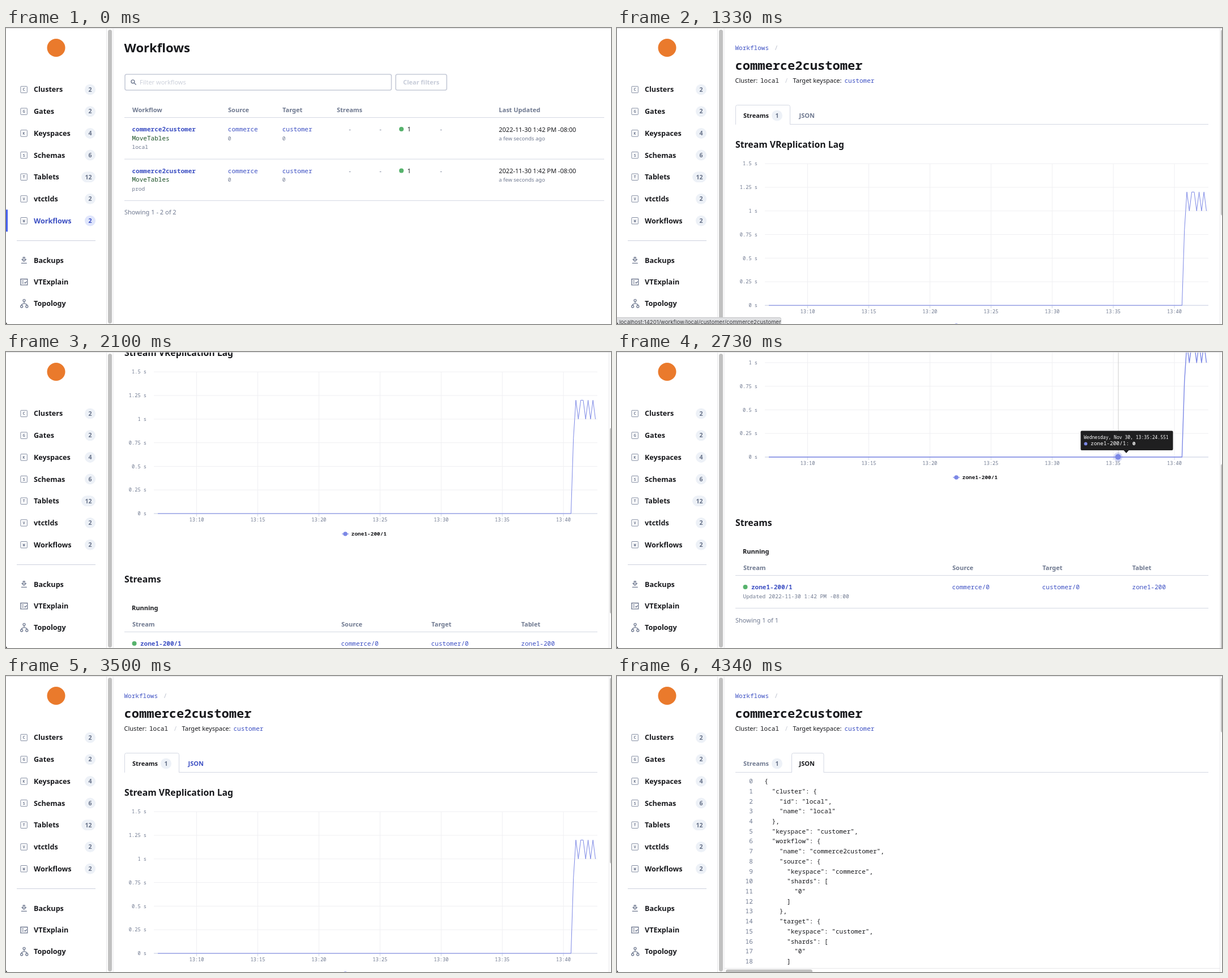
Animation, 1068 px wide and 524 px high, one loop 5.25 s. Source, as an HTML page:

```html
<!DOCTYPE html>
<html lang="en">
<head>
<meta charset="utf-8">
<title>Workflows</title>
<style>
  html, body { margin: 0; width: 100%; height: 100%; overflow: hidden; background: #fff; }
  svg { display: block; width: 1068px; height: 524px; font-family: "Noto Sans", sans-serif; }
  .m { font-family: "Noto Sans Mono", monospace; }
  .u { font-family: Inter, sans-serif; }
  .b { font-weight: 600; }
  .mid { text-anchor: middle; }
  .end { text-anchor: end; }
</style>
</head>
<body>
<svg id="stage" viewBox="0 0 1068 524"></svg>
<script>
const INK = '#17181c', GREY = '#6f7990', PALE = '#c6cbd8', LINK = '#3d50c3',
      RULE = '#d4d8e3', SERIES = '#7c88e6', GREEN = '#56b26c';
const S = 11.03, XS = 9.46;

// y is the middle of the capital letters
const text = (x, y, str, cls = '', fill = INK, size = S) =>
  `<text x="${x}" y="${y + size * .357}" class="${cls}" fill="${fill}" font-size="${size}">${str}</text>`;
const line = (x1, y1, x2, y2, stroke = RULE, w = 1) =>
  `<path d="M${x1} ${y1}L${x2} ${y2}" stroke="${stroke}" stroke-width="${w}"/>`;
const rect = (x, y, w, h, r, fill, stroke = 'none', sw = 1) =>
  `<rect x="${x}" y="${y}" width="${w}" height="${h}" rx="${r}" fill="${fill}" stroke="${stroke}" stroke-width="${sw}"/>`;
const dot = (x, y, r, fill, extra = '') => `<circle cx="${x}" cy="${y}" r="${r}" fill="${fill}" ${extra}/>`;
const group = (id, ...parts) => `<g id="${id}">${parts.flat().join('')}</g>`;
const range = n => [...Array(n).keys()];

function badge(right, y, n, on) {
  const w = n > 9 ? 25 : 19;
  return rect(right - w, y - 9.5, w, 19, 9.5, on ? '#e0e6fc' : '#edf1f7') +
    text(right - w / 2, y, n, 'b mid', on ? LINK : '#68738a', 10.6);
}

function sidebar() {
  const items = [['Clusters', 2], ['Gates', 2], ['Keyspaces', 4], ['Schemas', 6],
    ['Tablets', 12], ['vtctlds', 2], ['Workflows', 2]];
  const row = (label, n, y, on) =>
    rect(25.9, y - 5.7, 11.4, 11.4, .8, 'none', '#828ca1') +
    text(31.6, y, label[0].toUpperCase(), 'm b mid', GREY, 7) +
    text(49, y, label, 'b', on ? LINK : INK, 12.6) + badge(158, y, n, on);
  const tools = ['Backups', 'VTExplain', 'Topology'].map((s, i) =>
    text(49, 412 + i * 37.9, s, 'b', INK, 12.6));
  const icons = `<g fill="none" stroke="${GREY}" stroke-width="1.3">
    <path d="M30.3 406h2.8v4h2l-3.4 3.2-3.4-3.2h2zM26.8 416.3h10"/>
    <path d="M25.8 444.5h12v10.4h-12zM27.8 447.8h3.6M27.8 451.4h3.6M32.6 450.3l1.3 1.4 2.6-3"/>
    <circle cx="32" cy="482.3" r="2"/><circle cx="27.6" cy="493" r="2"/><circle cx="36.8" cy="493" r="2"/>
    <path d="M32 484.3v3.2M27.6 491v-1.6l4.4-2 4.8 2v1.6"/></g>`;
  return [
    dot(88.5, 35, 16, '#ea7a2c'),
    ...items.map(([s, n], i) => row(s, n, 109 + i * 38.7, false)),
    group('active', rect(20, 325, 140, 32, 0, '#fff'), rect(0, 321.5, 3, 39, 0, '#4560ee'),
      row('Workflows', 2, 341.2, true)),
    line(19, 376.5, 158, 376.5, '#ccd1de'), tools, icons,
    line(177.5, 0, 177.5, 524, '#e6e6e8'), line(189, 0, 189, 524, '#e6e6e8'),
    rect(180, 3, 7, 520, 3.5, '#c1c1c1')
  ];
}

function listPage() {
  const head = [[223, 'Workflow'], [392, 'Source'], [488, 'Target'], [584, 'Streams'], [870, 'Last Updated']];
  const row = (y, cluster) => [
    text(222.5, y, 'commerce2customer', 'm b', LINK),
    text(222.5, y + 15.7, 'MoveTables', 'm', '#1d5128'),
    text(222.5, y + 31.5, cluster, 'm', GREY, XS),
    text(391.8, y, 'commerce', 'm', LINK), text(391.8, y + 16, '0', 'm', GREY, XS),
    text(487.7, y, 'customer', 'm', LINK), text(487.7, y + 16, '0', 'm', GREY, XS),
    [607, 661, 768].map(x => text(x, y, '-', 'mid', GREY)),
    dot(698, y - .2, 4, GREEN), text(708.5, y, '1'),
    text(870, y + .5, '2022-11-30 1:42 PM -08:00'),
    text(870, y + 16, 'a few seconds ago', '', GREY, XS),
    line(209, y + 52.8, 1056, y + 52.8)
  ].flat();
  const field = c => rect(210, 82, 470.4, 28, 3, 'none', c === LINK ? c : PALE, 1.6) +
    `<g fill="none" stroke="${c}" stroke-width="1.4"><circle cx="223.9" cy="94.8" r="2.9"/><path d="M226 97l3.6 3.6"/></g>`;
  return group('list',
    text(208.5, 35.5, 'Workflows', 'b', INK, 22.06),
    field(GREY), group('focus', field(LINK)),
    text(236, 96.5, 'Filter workflows', '', '#cdd1db'),
    rect(688, 82, 90, 28, 3, 'none', PALE, 1.6),
    text(733, 96.3, 'Clear filters', 'b mid', PALE),
    head.map(([x, s]) => text(x, 145, s, 'b', GREY)),
    line(209, 158.5, 1056, 158.5),
    row(179.3, 'local'), row(252.8, 'prod'),
    text(209, 326.5, 'Showing 1 - 2 of 2', '', GREY));
}

function detailHead() {
  return [
    text(208.5, 35.5, 'Workflows', 'm', LINK), text(279, 35.5, '/', '', '#b9bfcc'),
    text(208.5, 66.5, 'commerce2customer', 'm b', INK, 22.06),
    text(208.5, 93, 'Cluster:'), text(253, 93, 'local', 'm'),
    text(297, 93, '/', '', '#c6cbd6'),
    text(310.5, 93, 'Target keyspace:'), text(401.5, 93, 'customer', 'm', LINK),
    line(209, 170.5, 1044, 170.5)
  ];
}

const tab = (x, w) =>
  `<path d="M${x} 171.5V139.5q0-3 3-3h${w - 6}q3 0 3 3V171.5" fill="#fff"/>` +
  `<path d="M${x} 171V139.5q0-3 3-3h${w - 6}q3 0 3 3V171" fill="none" stroke="${RULE}"/>`;

function chart() {
  const left = 261, right = 1044, base = 491;
  const yOf = v => base - v * 167.2, xOf = i => 336.5 + i * 107.92;
  const lag = [0, .8, 1.2, 1, 1.2, 1.2, 1, 1.2, 1, 1.2, 1];
  const pts = lag.map((v, i) => `${997.4 + i * 4.31} ${yOf(v)}`).join('L');
  return [
    range(7).map(i => line(left, yOf(i / 4), right, yOf(i / 4), '#efeff2') +
      text(248, yOf(i / 4) + .2, i / 4 + ' s', 'm end', GREY, 8.67)),
    range(7).map(i => line(xOf(i), 240, xOf(i), base, '#efeff2') + line(xOf(i), base, xOf(i), base + 5, '#ccd3e6') +
      text(xOf(i), 502.3, '13:' + (10 + i * 5), 'm mid', GREY, 8.67)),
    line(left, base, right, base, '#ccd3e6'),
    group('cross', line(885, 240, 885, base, '#cccccc')),
    `<path id="series" d="M268 ${base}L${pts}" fill="none" stroke="${SERIES}" stroke-linejoin="round"/>`,
    line(593, 527, 605, 527, SERIES, 1.2), dot(599, 527, 3.8, SERIES),
    text(609.5, 527, 'zone1-200/1', 'm b', INK, XS),
    group('tip',
      dot(884.5, base - .3, 8, SERIES, 'opacity=".3"'), dot(884.5, base - .3, 5, SERIES),
      rect(818.5, 444.5, 163, 34.5, 2, '#1f1f20'),
      '<path d="M894 478.5h10l-5 5.5z" fill="#1f1f20"/>',
      text(824, 455.7, 'Wednesday, Nov 30, 13:35:24.551', 'm', '#fff', 8.06),
      dot(827.4, 467.4, 2.9, SERIES),
      text(836, 467, 'zone1-200/1: <tspan class="b">0</tspan>', 'm', '#fff', XS))
  ].flat();
}

function streamsTab() {
  const head = [[223, 'Stream'], [592, 'Source'], [751, 'Target'], [909.5, 'Tablet']];
  return group('streams',
    tab(209.5, 96), text(223, 155, 'Streams', 'b'), badge(292, 155, 1),
    text(321.5, 155, 'JSON', 'b', GREY).replace('<text', '<text id="json-label"'),
    text(209, 206, 'Stream VReplication Lag', 'b', INK, 15.76),
    chart(),
    text(209, 607, 'Streams', 'b', INK, 15.76),
    text(222, 658.5, 'Running', 'b'),
    head.map(([x, s]) => text(x, 687, s, 'b', GREY)),
    line(209, 700.5, 1044, 700.5),
    dot(226.5, 721, 4, GREEN), text(237, 721.3, 'zone1-200/1', 'm b', LINK),
    text(222.5, 737.7, 'Updated 2022-11-30 1:42 PM -08:00', 'm', GREY, XS),
    [[591.5, 'commerce/0'], [750.5, 'customer/0'], [909.3, 'zone1-200']].map(([x, s]) => text(x, 721.3, s, 'm', LINK)),
    line(209, 758.5, 1044, 758.5),
    text(209, 779.6, 'Showing 1 of 1', '', GREY));
}

function jsonTab() {
  const side = keyspace => ({ keyspace, shards: ['0'] });
  const data = {
    cluster: { id: 'local', name: 'local' },
    keyspace: 'customer',
    workflow: { name: 'commerce2customer', source: side('commerce'), target: side('customer') }
  };
  const rows = JSON.stringify(data, null, 2).split('\n').slice(0, 19);
  return group('json',
    tab(308.5, 56.5), text(223, 155, 'Streams', 'b', GREY), badge(292, 155, 1),
    text(321.5, 155, 'JSON', 'b'),
    rows.map((s, i) => {
      const y = 186.3 + i * 17.71, code = s.trimStart();
      return text(239.8, y, i, 'm end', GREY) + text(260.3 + (s.length - code.length) * 6.62, y, code, 'm');
    }),
    rect(190, 517, 878, 7, 0, '#fff'),
    line(190, 517.5, 1064, 517.5, '#e6e6e8'), rect(192, 519.5, 153, 7, 3.5, '#c1c1c1'));
}

const URL_TEXT = 'localhost:14201/workflow/local/customer/commerce2customer';
const bubble = (id, w, str) => group(id,
  rect(-3, 512.5, w + 3, 14, 2.5, '#dfe0e2', '#c9cacc'), text(4, 520.6, str, 'u', '#3c3d40', 9.6));

stage.innerHTML = [
  listPage(),
  group('detail', group('scroller', detailHead(), streamsTab(), jsonTab()),
    line(1064.5, 0, 1064.5, 524, '#e8e8ea'),
    rect(1066, 3, 6, 329, 3, '#c1c1c1').replace('<rect', '<rect id="thumb"')),
  group('side', sidebar()),
  line(0, .5, 1068, .5, '#dedee0'),
  bubble('url1', 289.5, URL_TEXT), bubble('url2', 310.5, URL_TEXT + '/json'),
  '<path d="M0 521l2 3H0z" fill="#222"/>'
].join('');

const el = id => document.getElementById(id);
const set = (id, name, value) => el(id).setAttribute(name, value);
const show = (id, on) => set(id, 'opacity', +on);

// piecewise linear value through [time, value] keys
function track(t, ...keys) {
  let [t0, v0] = keys[0];
  for (const [t1, v1] of keys) {
    if (t < t1) return t <= t0 ? v0 : v0 + (v1 - v0) * (t - t0) / (t1 - t0);
    [t0, v0] = [t1, v1];
  }
  return v0;
}

const OPEN = 1190, JSON_OPEN = 3780, STEP = 70;

function draw(now) {
  const t = Math.floor(now % 5250 / STEP) * STEP;
  const detail = t >= OPEN, json = t >= JSON_OPEN;
  const scroll = track(t, [1960, 0], [2030, 60], [2100, 205], [2170, 305], [2730, 305], [2800, 268],
    [2870, 190], [2940, 115], [3010, 59], [3080, 26], [3150, 9], [3220, 0]);

  show('list', !detail);
  show('active', !detail);
  show('detail', detail);
  show('streams', !json);
  show('json', json);
  show('focus', track(t, [210, 0], [490, 1], [1050, 1], [1190, 0]));
  set('scroller', 'transform', `translate(0 ${-scroll})`);
  set('thumb', 'y', 3 + scroll * .64);
  set('thumb', 'height', json ? 97 : 329);

  const hover = t >= 2520 && t < 2870;
  show('tip', hover);
  show('cross', hover);
  set('series', 'stroke-width', t < 2520 || t >= 3290 ? 1 : t < 2800 ? 1.4 : 1.7);
  set('json-label', 'fill', t >= 3500 ? LINK : GREY);

  show('url1', 0);
  set('url1', 'opacity', track(t, [840, 0], [1050, 1], [1470, 1], [1820, 0]));
  set('url2', 'opacity', track(t, [3570, 0], [3780, 1], [4060, 1], [4340, 0]));
}

function tick() {
  draw(performance.now());
  requestAnimationFrame(tick);
}
tick();
</script>
</body>
</html>
```
